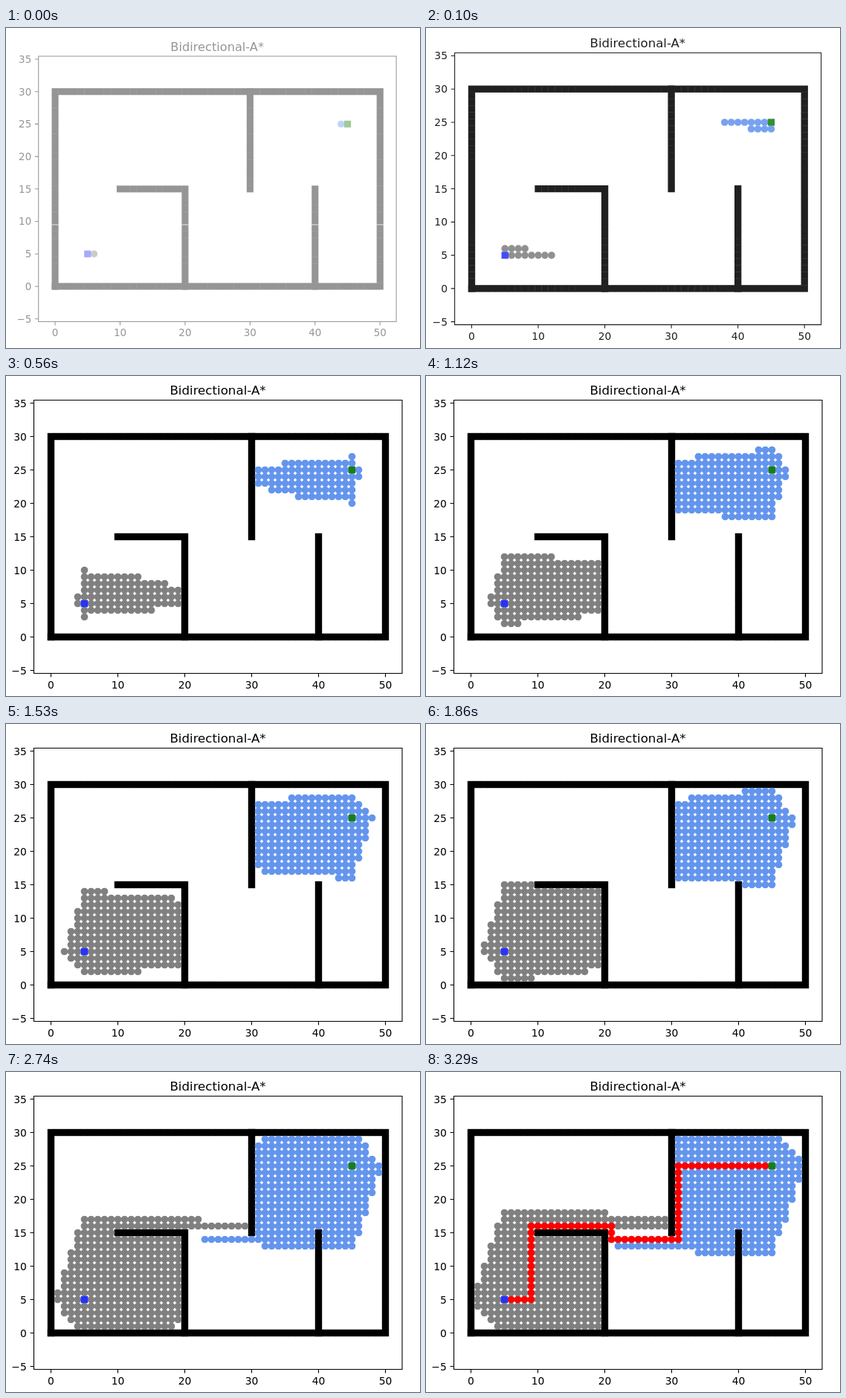
Recreate the animation shown at these times as an HTML page. Size 557 by 431 pixels, loop 3890 ms.

```html
<!DOCTYPE html>
<html lang="en">
<head>
<meta charset="utf-8">
<title>Bidirectional-A*</title>
<style>
  html, body { margin: 0; width: 100%; height: 100%; overflow: hidden; background: #fff; }
  svg { display: block; }
  text { font: 13.89px "DejaVu Sans", sans-serif; fill: #000; }
  .title { font-size: 16.67px; text-anchor: middle; }
  .xtick { text-anchor: middle; }
  .ytick { text-anchor: end; }
  .axes { fill: none; stroke: #000; stroke-width: 1.1; }
  .fore { fill: #808080; }
  .back { fill: #6495ed; }
  .path { fill: #f00; }
  .start { fill: #2733f8; }
  .goal { fill: #167f16; }
  .seam { fill: #fff; opacity: .8; }
</style>
</head>
<body>
<svg width="557" height="431" viewBox="0 0 557 431"><g id="figure"></g></svg>
<script>
const LOOP = 3890, PATH_AT = 3290, BATCH = 10;
const START = [5, 5], GOAL = [45, 25];
const ROUTE = [START, [9, 5], [9, 16], [21, 16], [21, 14], [31, 14], [31, 25], GOAL];

// Moments at which the next batch of visited cells is drawn
const BATCH_TIMES = [0, 100, 180, 285, 340, 395, 450, 505, 560, 610, 695, 780, 865, 950, 1035, 1120,
  1200, 1310, 1420, 1530, 1630, 1710, 1860, 1940, 2090, 2220, 2370, 2450, 2600, 2740, 2880, 3010, 3140];

// Window opening: time, opacity, scale
const OPENING = [[0, .41, .9715], [50, .68, .986], [100, .87, .995], [180, .96, 1], [230, 1, 1]];

const figure = document.getElementById('figure');
const px = x => Math.floor(60.04 + 9.018 * x) + .5;
const py = y => Math.floor(351.75 - 9.018 * y) + .5;
const key = ([x, y]) => x + ',' + y;

function add(parent, tag, attrs, text) {
  const el = document.createElementNS('http://www.w3.org/2000/svg', tag);
  for (const name in attrs) el.setAttribute(name, attrs[name]);
  if (text !== undefined) el.textContent = text;
  parent.appendChild(el);
  return el;
}
const dot = (parent, [x, y], cls) => add(parent, 'circle', { cx: px(x), cy: py(y), r: 4.86, class: cls });
const square = (parent, [x, y], cls) =>
  add(parent, 'rect', { x: px(x) - 4.7, y: py(y) - 4.7, width: 9.4, height: 9.4, class: cls });

// All grid cells on the straight segments of a polyline
function cells(points) {
  const list = [points[0]];
  for (let i = 1; i < points.length; i++) {
    let [x, y] = points[i - 1];
    const [tx, ty] = points[i];
    while (x !== tx || y !== ty) {
      x += Math.sign(tx - x);
      y += Math.sign(ty - y);
      list.push([x, y]);
    }
  }
  return list;
}

const walls = [
  [[0, 0], [50, 0], [50, 30], [0, 30], [0, 0]],
  [[10, 15], [20, 15], [20, 0]],
  [[30, 15], [30, 30]],
  [[40, 0], [40, 15]]
].flatMap(cells);
const blocked = new Set(walls.map(key));

class Search {
  constructor(from, to) {
    this.to = to;
    this.open = [];
    this.closed = [];
    this.cost = new Map();
    this.reach(from, 0);
  }
  reach(cell, g) {
    const k = key(cell);
    if (blocked.has(k) || g >= (this.cost.has(k) ? this.cost.get(k) : Infinity)) return;
    this.cost.set(k, g);
    const dx = this.to[0] - cell[0], dy = this.to[1] - cell[1];
    this.open.push({ f: g + Math.sqrt(dx * dx + dy * dy), cell });
  }
  // Expands the best cell; true once it touches the other search
  step(other) {
    this.open.sort((a, b) => a.f - b.f || a.cell[0] - b.cell[0] || a.cell[1] - b.cell[1]);
    const { cell } = this.open.shift();
    if (other.cost.has(key(cell))) return true;
    this.closed.push(cell);
    const [x, y] = cell, g = this.cost.get(key(cell)) + 1;
    for (const [dx, dy] of [[-1, 0], [0, 1], [1, 0], [0, -1]]) this.reach([x + dx, y + dy], g);
    return false;
  }
}

const fore = new Search(START, GOAL), back = new Search(GOAL, START);
while (!fore.step(back) && !back.step(fore));

// Axes and labels
add(figure, 'text', { x: 285, y: 25, class: 'title' }, 'Bidirectional-A*');
let ticks = 'M37.5 32.5H533V400.5H37.5Z';
for (let x = 0; x <= 50; x += 10) {
  ticks += `M${px(x)} 400.5v5`;
  add(figure, 'text', { x: px(x), y: 421, class: 'xtick' }, x);
}
for (let y = -5; y <= 35; y += 5) {
  ticks += `M37.5 ${py(y)}h-5`;
  add(figure, 'text', { x: 27.8, y: py(y) + 5, class: 'ytick' }, String(y).replace('-', '\u2212'));
}
add(figure, 'path', { d: ticks, class: 'axes' });

walls.forEach(cell => square(figure, cell));
const seam = add(figure, 'g', { class: 'seam' });
for (const x of [0, 20, 40, 50]) add(seam, 'rect', { x: px(x) - 5, y: 265.5, width: 10, height: 1 });

// Visited cells: one first, then ten of each per batch
const batches = [];
function addVisited(list, cls) {
  list.slice(1).forEach((cell, i) => {
    const n = Math.ceil(i / BATCH);
    if (!batches[n]) batches[n] = add(figure, 'g', {});
    dot(batches[n], cell, cls);
  });
}
addVisited(fore.closed, 'fore');
addVisited(back.closed, 'back');

const route = add(figure, 'g', {});
cells(ROUTE).slice(1, -1).forEach(cell => dot(route, cell, 'path'));
square(figure, START, 'start');
square(figure, GOAL, 'goal');

const show = (el, on) => el.setAttribute('visibility', on ? 'visible' : 'hidden');

function draw(t) {
  const [, opacity, scale] = OPENING.filter(o => o[0] <= t).pop();
  const shrink = 1 - scale;
  figure.setAttribute('opacity', opacity);
  figure.setAttribute('transform', `translate(${256 * shrink} ${228 * shrink}) scale(${scale})`);
  show(seam, t < 50);
  batches.forEach((b, n) => show(b, t >= (n < BATCH_TIMES.length ? BATCH_TIMES[n] : PATH_AT)));
  show(route, t >= PATH_AT);
}

const begin = performance.now();
function tick(now) {
  draw(Math.max(0, now - begin) % LOOP);
  requestAnimationFrame(tick);
}
draw(0);
requestAnimationFrame(tick);
</script>
</body>
</html>
```
